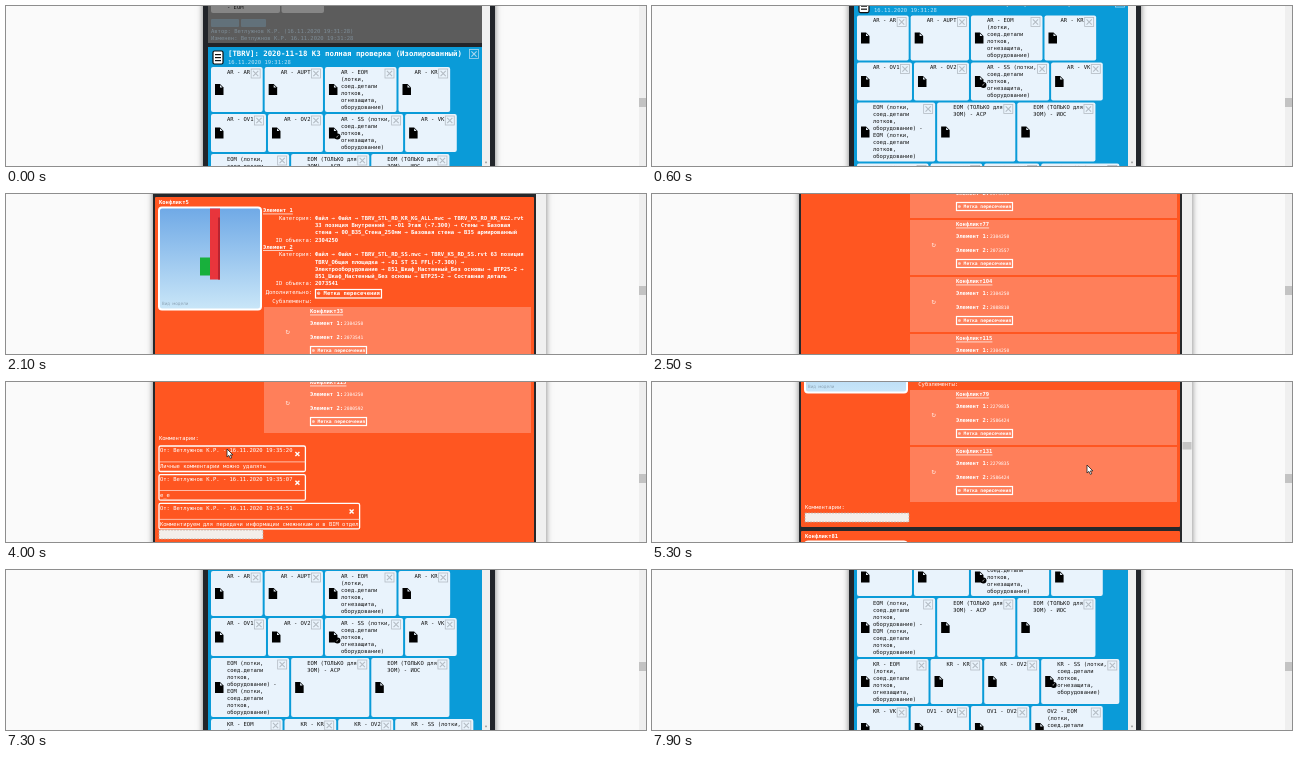
Write an HTML page with a canvas that moves like this. It is 640 px wide and 160 px high and loops after 8 s.

```html
<!DOCTYPE html>
<html lang="ru">
<head>
<meta charset="utf-8">
<title>Отчёт о проверке</title>
<style>
html, body { margin: 0; width: 100%; height: 100%; overflow: hidden; background: #fafafa; }
canvas { display: block; }
</style>
</head>
<body>
<canvas id="stage" width="640" height="160"></canvas>
<script>
const ctx = document.getElementById('stage').getContext('2d');
const LOOP = 8000;
const STEP = 100;
const MONO = '"DejaVu Sans Mono", monospace';
const CHAR = 3.31;
const LINE = 7.3;
const AUTHOR = 'Ветлужнов К.Р.';

// ---- Motion ----

const ramp = (t, from, to) => Math.min(1, Math.max(0, (t - from) / (to - from)));

const listScroll = t => 60 * (ramp(t, 0, 700) + ramp(t, 7300, 7900));

const reportScroll = t => 288 * (ramp(t, 2100, 2900) - 1)
  + 2276 * ramp(t, 4000, 5300) - 95 * ramp(t, 5700, 6300) - 61 * ramp(t, 6600, 7000);

// Places the pointer reaches, each after a short glide.
const GLIDE = 300;
const STOPS = [
  { at: 1000, x: 300, y: -10 },
  { at: 2900, x: 221, y: 67 },
  { at: 4800, x: 435, y: 83 },
  { at: 5600, x: 283, y: 34 },
  { at: 6300, x: 327, y: 119 },
  { at: 7000, x: 420, y: -20 }
];

function pointerAt(t) {
  let x = 300, y = -30;
  for (const stop of STOPS) {
    const k = ramp(t, stop.at - GLIDE, stop.at);
    x += (stop.x - x) * k;
    y += (stop.y - y) * k;
  }
  return [x, y];
}

// ---- Drawing helpers ----

function rect(x, y, w, h, color) {
  ctx.fillStyle = color;
  ctx.fillRect(x, y, w, h);
}

function frame(x, y, w, h, color, line) {
  ctx.strokeStyle = color;
  ctx.lineWidth = line;
  ctx.strokeRect(x, y, w, h);
}

function round(x, y, w, h, r, fill, stroke, line = 1) {
  ctx.beginPath();
  ctx.roundRect(x, y, w, h, r);
  if (fill) { ctx.fillStyle = fill; ctx.fill(); }
  if (stroke) { ctx.strokeStyle = stroke; ctx.lineWidth = line; ctx.stroke(); }
}

function shape(path, x, y, fill, stroke) {
  ctx.save();
  ctx.translate(x, y);
  ctx.fillStyle = fill;
  ctx.fill(path);
  if (stroke) { ctx.strokeStyle = stroke; ctx.lineWidth = 0.8; ctx.stroke(path); }
  ctx.restore();
}

function text(str, x, y, { size = 5.5, color = '#fff', bold = false, align = 'left', underline = false } = {}) {
  ctx.font = (bold ? 'bold ' : '') + size + 'px ' + MONO;
  ctx.textAlign = align;
  ctx.textBaseline = 'middle';
  ctx.fillStyle = color;
  ctx.fillText(str, x, y);
  if (underline) ctx.fillRect(x, y + 2.6, ctx.measureText(str).width, 0.7);
}

function cross(x, y, r, color, width) {
  ctx.beginPath();
  ctx.moveTo(x - r, y - r); ctx.lineTo(x + r, y + r);
  ctx.moveTo(x + r, y - r); ctx.lineTo(x - r, y + r);
  ctx.strokeStyle = color;
  ctx.lineWidth = width;
  ctx.stroke();
}

function windowBox(x, w, color) {
  ctx.save();
  ctx.shadowColor = 'rgba(0,0,0,.5)';
  ctx.shadowBlur = 6;
  rect(x, -20, w, 200, color);
  ctx.restore();
}

const longest = lines => Math.max(...lines.map(s => s.length));

// ---- Blue list of checks ----

const TRAYS = '(лотки,|соед.детали|лотков,|огнезащита,|оборудование)';
const SS_TRAYS = ' - SS ' + TRAYS;
const EOM_TRAYS = 'EOM (лотки,|соед.детали|лотков,|оборудование)';
const ROWS = [
  ['AR - AR', 'AR - AUPT', 'AR - EOM|' + TRAYS, 'AR - KR'],
  ['AR - OV1', 'AR - OV2', 'AR' + SS_TRAYS, 'AR - VK'],
  [EOM_TRAYS + ' -|' + EOM_TRAYS, 'EOM (ТОЛЬКО для|ЭОМ) - АСР', 'EOM (ТОЛЬКО для|ЭОМ) - ИОС'],
  ['KR - EOM|' + TRAYS, 'KR - KR', 'KR - OV2', 'KR' + SS_TRAYS],
  ['KR - VK', 'OV1 - OV1', 'OV1 - OV2', 'OV2 - EOM|' + TRAYS]
].map(row => row.map(s => s.split('|')));

const PAGE = new Path2D('M0-5.5H5L8.5-2V5.5H0Z');
const FOLD = new Path2D('M5-4.5L7.5-2H5Z');

function closeBox(x, y, color) {
  frame(x + 0.5, y + 0.5, 9, 9, color, 0.8);
  cross(x + 5, y + 5, 2.6, color, 1.1);
}

function fileIcon(x, y, checked) {
  shape(PAGE, x, y, '#000');
  shape(FOLD, x, y, '#e9f3fc');
  if (!checked) return;
  round(x + 5.5, y + 0.5, 6, 6, 3, '#000');
  text('✓', x + 8.5, y + 3.5, { size: 5, align: 'center' });
}

function checkButton(lines, x, y, w, h) {
  round(x, y, w, h, 2, '#e9f3fc');
  fileIcon(x + 4, y + h / 2, lines[0].includes(' - SS'));
  lines.forEach((s, i) => text(s, x + 16, y + 5.5 + i * 7, { color: '#111' }));
  closeBox(x + w - 12, y + 1.5, '#b4bcc4');
}

function dimmedCard() {
  rect(202, -40, 274, 77, '#5c5c5c');
  round(205, -30, 69, 37, 2, '#868686');
  round(275.5, -30, 42.5, 37, 2, '#868686');
  text('- EOM', 221, 2, { color: '#151515' });
  round(205, 13, 28, 8, 1, '#62717a');
  round(235, 13, 25, 8, 1, '#62717a');
  const faint = { color: '#7d8c96' };
  text(`Автор: ${AUTHOR} (16.11.2020 19:31:28)`, 205, 25.5, faint);
  text(`Изменен: ${AUTHOR} 16.11.2020 19:31:28`, 205, 32.5, faint);
}

function listHeader() {
  round(207, 45, 10, 13, 1.5, '#fff', '#111', 1.2);
  for (let i = 0; i < 3; i++) rect(209, 48 + i * 3, 6, 1.2, '#111');
  text('[TBRV]: 2020-11-18 K3 полная проверка (Изолированный)', 222, 48.5, { size: 7.33, bold: true });
  text('16.11.2020 19:31:28', 222, 56.5, { color: '#bfe4f7' });
  closeBox(463, 43, '#a9d6ee');
}

function drawList(scroll) {
  windowBox(197, 292, '#22252a');
  ctx.save();
  ctx.beginPath();
  ctx.rect(202, 0, 274, 160);
  ctx.clip();
  ctx.translate(0, -scroll);
  dimmedCard();
  rect(202, 41, 274, 400, '#0a9bd8');
  listHeader();
  let y = 61;
  for (const row of ROWS) {
    const h = Math.max(...row.map(lines => lines.length)) * 7 + 3;
    let x = 205;
    for (const lines of row) {
      const w = longest(lines) * CHAR + 28.5;
      checkButton(lines, x, y, w, h);
      x += w + 2;
    }
    y += h + 2;
  }
  ctx.restore();
  rect(476, 0, 8, 160, '#f0f0f0');
  text('▾', 480, 157, { size: 5, color: '#777', align: 'center' });
}

// ---- Orange conflict report ----

const FIRST = {
  num: 5,
  element: 2304250,
  subs: [[33, 2073541], [77, 2073557], [104, 2088810], [115, 2080592]],
  comments: [
    ['19:35:20', 'Личные комментарии можно удалять'],
    ['19:35:07', 'e_e'],
    ['19:34:51', 'Комментируем для передачи информации смежникам и в BIM отдел']
  ]
};

function laterCard(_, i) {
  const num = 54 + i * 3;
  const element = 2279299 + i * 67;
  const other = element + 306589;
  return { num, element, subs: [[num + 1, other], [num + 53, other]], comments: [] };
}

const CARDS = [FIRST, ...Array.from({ length: 10 }, laterCard)];

const PATHS = [
  ['Файл → Файл → TBRV_STL_RD_KR_KG_ALL.nwc → TBRV_K5_RD_KR_KG2.rvt',
    '33 позиция Внутренний → -01 Этаж (-7.300) → Стены → Базовая',
    'стена → 00_В35_Стена_250мм → Базовая стена → В35 армированный'],
  ['Файл → Файл → TBRV_STL_RD_SS.nwc → TBRV_K5_RD_SS.rvt 63 позиция',
    'TBRV_Общая площадка → -01 ST S1 FFL(-7.300) →',
    'Электрооборудование → 851_Шкаф_Настенный_Без основы → ШТР25-2 →',
    '851_Шкаф_Настенный_Без основы → ШТР25-2 → Составная деталь']
];

const cardHeight = c => 133 + c.subs.length * 57 + (c.comments.length ? 86 : 0);

function preview(x, y, size) {
  ctx.save();
  ctx.translate(x, y);
  ctx.scale(size / 102, size / 102);
  const sky = ctx.createLinearGradient(0, 0, 0, 102);
  sky.addColorStop(0, '#6fa9e6');
  sky.addColorStop(1, '#c9e6f8');
  round(0, 0, 102, 102, 3, sky, '#fff', 2);
  rect(41, 50, 10, 18, '#18b03c');
  rect(51, 1, 10, 71, '#e8353c');
  rect(59, 10, 2, 62, '#b82330');
  text('Вид модели', 3, 96, { size: 4.4, color: '#8ea6b8' });
  ctx.restore();
}

function markButton(x, y, w, h, size) {
  frame(x + 0.5, y + 0.5, w, h, '#fff', 1.2);
  text('⊕ Метка пересечения', x + 2, y + h / 2 + 0.7, { size, bold: true });
}

function subItem(num, ids, y, loaded) {
  rect(258, y, 267, 55, '#ff7f5a');
  if (loaded) preview(262, y + 4, 40);
  else text('↻', 282, y + 25, { size: 8, color: '#ffe3da', align: 'center' });
  text('Конфликт' + num, 304, y + 5, { bold: true, underline: true });
  ids.forEach((id, i) => {
    const row = y + 16.3 + i * 14.2;
    text(`Элемент ${i + 1}:`, 304, row, { bold: true });
    text(id, 338, row + 0.5, { size: 4.6 });
  });
  markButton(304, y + 39, 56, 8, 4.65);
}

function details(c, top) {
  const label = (s, y) => text(s, 306, y, { align: 'right' });
  const line = (s, y) => text(s, 309, y, { bold: true });
  const ids = [c.element, c.subs[0][1]];
  let y = top + 14;
  PATHS.forEach((path, i) => {
    text(`Элемент ${i + 1}`, 257, y, { bold: true, underline: true });
    label('Категория:', y + LINE);
    for (const s of path) line(s, y += LINE);
    label('ID объекта:', y += LINE);
    line(ids[i], y);
    y += LINE;
  });
  label('Дополнительно:', top + 96);
  markButton(309, top + 92, 66, 8.5, 5.5);
  label('Субэлементы:', top + 105);
}

function comment([time, body], y) {
  const head = `От: ${AUTHOR} - 16.11.2020 ${time}`;
  const w = Math.max(head.length * CHAR + 14, body.length * CHAR + 2);
  round(153, y, w, 25.5, 1.5, null, '#fff', 1.3);
  text(head, 154, y + 5);
  rect(153, y + 15.5, w, 0.8, '#ffd5c8');
  text(body, 154, y + 21);
  cross(153 + w - 8, y + 8, 2, '#fff', 1.4);
}

function drawCard(c, y, t) {
  const h = cardHeight(c);
  round(149, y, 379, h, 1, '#ff5621');
  text('Конфликт' + c.num, 153, y + 5.5, { bold: true });
  if (t >= 1500) preview(153, y + 10.5, 102);
  details(c, y);
  c.subs.forEach(([num, other], i) =>
    subItem(num, [c.element, other], y + 110 + i * 57, num === 79 && t >= 5800));
  const end = y + 108 + c.subs.length * 57;
  text('Комментарии:', 153, end + 6);
  c.comments.forEach((m, i) => comment(m, end + 13 + i * 28.7));
  rect(153, y + h - 14, 104, 9, '#f3eeea');
  ctx.setLineDash([2, 1]);
  frame(153, y + h - 14, 104, 9, '#b9aaa2', 0.7);
  ctx.setLineDash([]);
}

function drawReport(t) {
  windowBox(147, 393, '#fbfbfb');
  if (t < 1400) return;

  const scroll = reportScroll(t);
  rect(147, 0, 383, 160, '#26282b');
  let y = -285 - scroll;
  for (const c of CARDS) {
    const h = cardHeight(c);
    if (y < 160 && y + h > 0) drawCard(c, y, t);
    y += h + 4;
  }
  rect(530, 0, 10, 160, '#f0f0f0');
  rect(530.5, -11 + scroll * 0.0312, 9, 7.5, '#c4c4c4');
}

// ---- Stage ----

const ARROW = new Path2D('M0 0V8L1.9 6.4 3.3 9.4 4.7 8.8 3.4 5.9H5.9Z');

function draw(t) {
  rect(0, 0, 640, 160, '#fafafa');
  rect(633, 0, 7, 160, '#efefef');
  rect(633, 92, 7, 9, '#c3c3c3');
  if (t >= 1300 && t < 7300) drawReport(t);
  else drawList(listScroll(t));
  shape(ARROW, ...pointerAt(t), '#fff', '#222');
}

const start = performance.now();
function tick() {
  const t = (performance.now() - start) % LOOP;
  draw(Math.floor(t / STEP) * STEP);
  requestAnimationFrame(tick);
}
tick();
</script>
</body>
</html>
```
